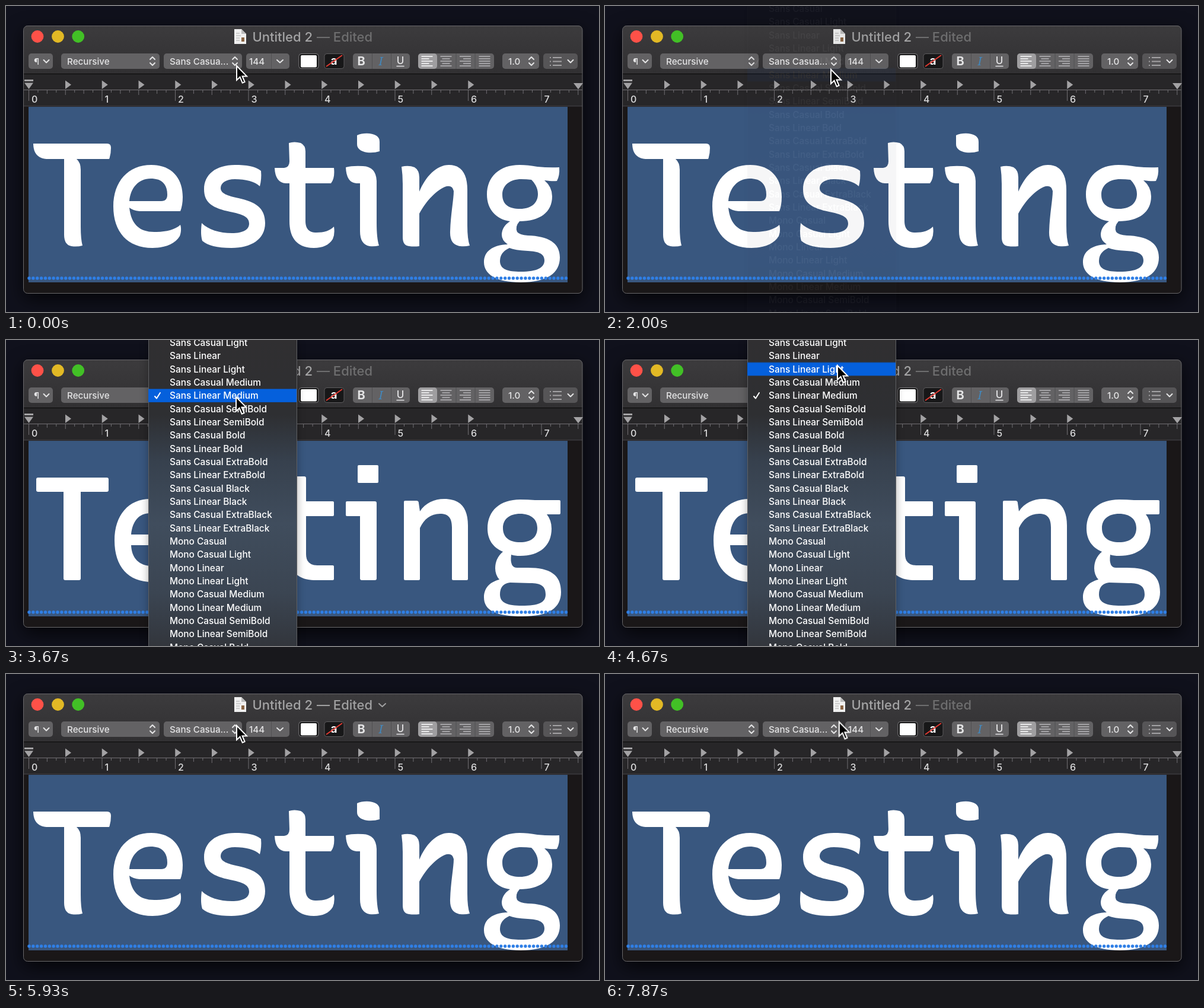
Animation, 1000 px wide and 516 px high, one loop 7940 ms. Source, as an HTML page:

```html
<!DOCTYPE html>
<html lang="en">
<head>
<meta charset="utf-8">
<title>Font style menu</title>
<style>
html, body { margin: 0; width: 100%; height: 100%; overflow: hidden; background: #10111c; }
svg { display: block; width: 100vw; height: 100vh; }
text { font: 500 15.2px Inter, Roboto, sans-serif; fill: #e4e4e5; }
.title { font-size: 22px; fill: #a4a4a5; }
.mid { text-anchor: middle; }
.num { font-size: 16px; fill: #dcdcdd; }
.menu text { font-size: 15.4px; fill: #fff; }
.line { fill: none; stroke: #e4e4e5; stroke-width: 2; stroke-linecap: round; stroke-linejoin: round; }

/* One loop is 7940 ms, so 1% is 79.4 ms. */
.a { animation: 7940ms linear infinite; }
.hard { animation-timing-function: step-end; }
#menuCasual { animation-name: openCasual; }
#menuLinear { animation-name: openLinear; }
#menuCasual .bar { animation-name: pickLinear; }
#menuLinear .bar { animation-name: pickCasual; }
.casual { animation-name: showCasual; }
.linear { animation-name: showLinear; }
#edited { animation-name: brighten; }
#titleArrow { animation-name: hover; }
#cursor { animation-name: point; }

@keyframes openCasual {
  0%, 6.67% { opacity: 0; } 6.68%, 22.4% { opacity: 1; } 25.35%, 100% { opacity: 0; }
}
@keyframes openLinear {
  0%, 36.14% { opacity: 0; } 36.15%, 63.6% { opacity: 1; } 66.5%, 100% { opacity: 0; }
}
@keyframes pickLinear {
  0% { transform: translateY(0); } 19% { transform: translateY(22.33px); }
}
@keyframes pickCasual {
  0% { transform: translateY(0); }
  51.4% { transform: translateY(-22.33px); }
  54.2% { transform: translateY(-44.66px); }
  61.1% { transform: translateY(-22.33px); }
}
@keyframes showCasual {
  0% { visibility: visible; } 26.07% { visibility: hidden; } 67.4% { visibility: visible; }
}
@keyframes showLinear {
  0% { visibility: hidden; } 26.07% { visibility: visible; } 67.4% { visibility: hidden; }
}
@keyframes brighten {
  0%, 67% { fill: #6e6e6f; } 69%, 81.5% { fill: #a0a0a1; } 84.5%, 100% { fill: #6e6e6f; }
}
@keyframes hover {
  0%, 67% { opacity: 0; } 69%, 81.5% { opacity: 1; } 84.5%, 100% { opacity: 0; }
}
@keyframes point {
  0% { transform: translate(389px, 101px); }
  6.3% { transform: translate(384px, 92px); }
  12.6% { transform: translate(383px, 92px); }
  16.4% { transform: translate(382px, 94px); }
  19.5%, 25.2% { transform: translate(381px, 107px); }
  30.2% { transform: translate(386px, 98px); }
  36.1%, 49.7% { transform: translate(388px, 96px); }
  56.7%, 59.4% { transform: translate(392px, 43px); }
  62.3% { transform: translate(390px, 72px); }
  69.3% { transform: translate(389px, 74px); }
  74.7% { transform: translate(389px, 87px); }
  82% { transform: translate(390px, 90px); }
  99.1% { transform: translate(395px, 80px); }
  100% { transform: translate(389px, 101px); }
}
</style>
</head>
<body>
<svg viewBox="0 0 1000 516" preserveAspectRatio="none">
  <defs>
    <linearGradient id="chrome" x2="0" y2="1">
      <stop stop-color="#3c3b3d"/><stop offset="1" stop-color="#313032"/>
    </linearGradient>
    <linearGradient id="glass" x2="0" y2="1">
      <stop stop-color="#302f31"/><stop offset=".25" stop-color="#2e2f32"/>
      <stop offset=".4" stop-color="#37414e"/><stop offset=".6" stop-color="#404d5d"/>
      <stop offset=".82" stop-color="#3b4552"/><stop offset="1" stop-color="#32353b"/>
    </linearGradient>
    <clipPath id="frame"><rect x="30" y="33" width="942" height="452" rx="7"/></clipPath>
  </defs>
  <rect width="1000" height="516" fill="#10111c"/>
  <rect x="30" y="33" width="942" height="452" rx="7" style="filter:drop-shadow(0 9px 15px #000b)"/>

  <g clip-path="url(#frame)">
    <rect x="30" y="33" width="942" height="452" fill="#1a1718"/>
    <rect x="30" y="33" width="942" height="81" fill="url(#chrome)"/>
    <rect x="30" y="114" width="942" height="55" fill="#272628"/>
    <path d="M30 114.5H972" stroke="#080808"/>
    <path d="M30 168.8H972" stroke="#48474a"/>
  </g>
  <rect x="29.5" y="33.5" width="942.5" height="451" rx="7" fill="none" stroke="#69686b"/>

  <circle cx="53" cy="51.5" r="10.4" fill="#fe5148"/>
  <circle cx="87.5" cy="51.5" r="10.4" fill="#e2b925"/>
  <circle cx="121.7" cy="51.5" r="10.4" fill="#42c026"/>

  <path d="M385 39H397L405 47V64H385Z" fill="#f0f0f0"/>
  <path d="M397 39V47H405Z" fill="#bbb"/>
  <path d="M388 46H394M388 50H396M388 54H394M388 58H394" stroke="#aaa"/>
  <path d="M397 53H402V60H397Z" fill="#8b6544"/>
  <text class="title" x="415.5" y="60">Untitled 2</text>
  <text id="edited" class="title a" x="524" y="60">— Edited</text>
  <path id="titleArrow" class="line a" d="M629 50L634.5 55L640 50" style="stroke:#a0a0a1"/>

  <g id="toolbar"></g>
  <text x="47" y="98.5">¶</text>
  <text x="103" y="98.5">Recursive</text>
  <text class="a hard casual" x="276" y="98.5">Sans Casua...</text>
  <text class="a hard linear" x="276" y="98.5">Sans Linea...</text>
  <text x="410" y="98.5">144</text>
  <text x="847" y="98.5">1.0</text>
  <path d="M447.5 80V106M617.5 80V106M649.5 80V106M759 80V106M791 80V106" stroke="#515052"/>
  <rect x="494" y="80.5" width="33" height="25" rx="4" fill="#161617" stroke="#7c7b7d"/>
  <rect x="497" y="83" width="27" height="20.5" rx="2" fill="#fff"/>
  <rect x="537" y="80.5" width="33" height="25" rx="4" fill="#171718" stroke="#5c5b5d"/>
  <text class="mid" x="553" y="98.5" style="font-size:19px;font-weight:700;fill:#fff">a</text>
  <path d="M540 102L567 83" stroke="#e33a32" stroke-width="2"/>
  <text class="mid" x="599" y="99.5" style="font-size:20px;font-weight:700">B</text>
  <text class="mid" x="632" y="99.5" style="font:italic 19px 'Noto Serif',serif;fill:#4387bb">I</text>
  <text class="mid" x="665" y="97.5" style="font-size:17px">U</text>
  <path d="M659 101.5H671" class="line" style="stroke-width:1.5"/>

  <g id="ruler"></g>
  <path d="M31 124H46V127H31ZM31 129.5H46L38.5 140ZM957 130H973L965 140.5Z" fill="#a3a2a4"/>

  <rect x="38" y="170" width="909" height="296" fill="#39577f"/>
  <g id="words" fill="#fff"></g>
  <path d="M39 459H946" stroke="#2f7fe6" stroke-width="5.4" stroke-linecap="round" stroke-dasharray="0 6.86"/>

  <g id="menuCasual" class="menu a"></g>
  <g id="menuLinear" class="menu a"></g>
  <path id="cursor" class="a" d="M0 0V24L5.6 18.8L9.7 28.6L13.6 27L9.5 17.4H17Z" stroke="#fff" stroke-width="2"/>
</svg>
<script>
const byId = id => document.getElementById(id);
const range = n => [...Array(n).keys()];
const path = (d, attrs = 'class="line"') => `<path d="${d}" ${attrs}/>`;

// Toolbar
const button = (x, end, fill = '#636264') =>
  `<rect x="${x}" y="80" width="${end - x}" height="26" rx="5" fill="${fill}"/>`;
const stepper = x => path(`M${x - 4} 90l4 -4l4 4M${x - 4} 96l4 4l4 -4`);
const down = (x, w = 4.5) => path(`M${x - w} 91l${w} 4.5l${w} -4.5`);
const alignIcon = (center, shift) => range(5).map(i => {
  const short = shift === null || i % 2 === 0 ? 0 : 6;
  const x = center - 9.5 + short * (shift || 0);
  return `M${x} ${85 + 4 * i}h${19 - short}`;
}).join('');

byId('toolbar').innerHTML =
  [[38, 79], [93, 259], [266, 398], [405, 478], [585, 681], [695, 823], [837, 899]]
    .map(([x, end]) => button(x, end)).join('') +
  button(906, 964, '#565557') + button(695, 727, '#9f9ea0') +
  [247, 386, 886].map(stepper).join('') +
  down(68) + down(462, 5) + down(952) +
  path(alignIcon(710, 0), 'stroke="#fff" stroke-width="1.6"') +
  path(alignIcon(742, .5) + alignIcon(774.5, 1) + alignIcon(807, null), 'stroke="#b9b8ba" stroke-width="1.6"') +
  path('M917 87h2m3 0h15M917 93.5h2m3 0h15M917 100h2m3 0h15', 'stroke="#a3a2a4" stroke-width="1.8"');

// Ruler
const inch = 123.5;
const tickLength = i => i % 8 === 0 ? 18 : i % 4 === 0 ? 8 : i % 2 === 0 ? 6 : 4;
byId('ruler').innerHTML =
  path('M30 141.5H972' + range(61).map(i => `M${38.5 + i * inch / 8} 142v${tickLength(i)}`).join(''), 'stroke="#716f73"') +
  path(range(12).map(i => `M${100 + i * inch / 2} 125.5l10 7.3l-10 7.3z`).join(''), 'fill="#a3a2a4"') +
  range(8).map(i => `<text class="num" x="${43 + i * inch}" y="163">${i}</text>`).join('');

// Large lettering, one outline per letter: T e s t i n g
const casual = [
  'M46 232H169Q177 231 177 239Q177 250 174 258H119Q126 264 126 276V372Q126 393 129 404Q122 406 114 405.5Q98 405 98 386V258H68Q46 256 46 232Z',
  `M208 340C211 368 225 381 250 381C269 381 284 378 294 369C296 375 295 383 293 388C285 402 266 408 247 408C205 408 181 381 181 338C181 296 206 268 245 268C280 268 298 291 298 322Q298 336 294 346H225Q214 345 208 340Z
   M208 329H262Q272 329 272 318C272 300 262 291 244 291C224 291 210 306 208 329Z`,
  'M428 304C420 296 404 292 386 292C370 292 362 299 362 307C362 316 373 320 392 324C420 330 437 340 437 366C437 393 414 408 380 408C356 408 340 404 331 396C328 386 329 375 330 366C341 377 360 383 381 383C400 383 410 377 410 367C410 355 398 351 378 347C350 341 334 333 334 309C334 284 354 268 386 268C405 268 420 270 430 278C431 288 430 296 428 304Z',
  'M477 231Q486 228 497 231Q505 235 505 245V273H553Q555 290 548 299H505V362C505 376 511 382 524 382C536 382 546 379 553 372Q555 384 551 393C545 403 534 408 519 408C492 408 478 392 478 363V299H472Q454 298 453 273H469Q478 272 478 262Z',
  `M592 218Q601 214 613 215Q630 217 630 229V245Q621 248 609 247Q592 244 592 233Z
   M573 272Q584 269 602 270Q624 271 625 295V365Q625 392 629 404Q621 406 613 405Q597 402 597 380V299H591Q574 298 573 272Z`,
  'M667 271Q679 268 689 272Q697 277 697 289V313C708 287 726 268 747 268C768 268 778 283 778 310V370Q778 393 782 404Q774 406 766 405Q748 403 749 380C750 350 755 326 755 312Q753 302 743 304C727 309 709 328 697 350V405Q688 406 680 405Q669 404 669 390V300Q669 285 667 271Z',
  `M866 268C876 268 885 269 896 271Q916 273 933 272Q934 286 929 295Q922 296 908 294Q921 305 921 321C921 348 900 363 866 363Q858 372 862 381Q866 386 880 387C914 388 934 399 934 424C934 450 913 466 868 466C826 466 806 452 806 432C806 414 820 403 846 402Q836 395 836 386Q836 372 850 363C827 360 811 343 811 318C811 288 832 268 866 268Z
   M869 292C850 292 837 302 837 318C837 334 847 342 867 342C886 342 897 332 897 317C897 306 891 298 886 293Q878 292 869 292Z
   M849 408Q833 415 833 430C833 444 846 448 868 448C896 448 908 441 908 429C908 417 897 414 880 413Q858 412 849 408Z`
];
const linear = [
  'M54 232H170q3 0 3 3V253q0 3-3 3H126V402q0 3-3 3H100q-3 0-3-3V256H54q-3 0-3-3V235q0-3 3-3Z',
  `M211 346C212 368 224 381 247 381C262 381 273 376 283 367L296 385C283 400 267 408 246 408C206 408 183 382 183 338C183 295 207 268 243 268C279 268 297 293 297 330V346Z
   M211 328H270C269 304 260 292 243 292C224 292 213 306 211 328Z`,
  'M417 303C408 296 397 292 384 292C369 292 361 298 361 307C361 317 372 320 390 325C418 331 433 341 433 366C433 393 412 408 380 408C358 408 342 402 329 390L345 371C355 379 366 383 380 383C397 383 406 377 406 367C406 355 396 352 376 347C349 341 334 332 334 309C334 284 354 268 384 268C404 268 419 273 431 284Z',
  'M481 230H503q3 0 3 3V272H551q2 0 2 2V295q0 2-2 2H506V361Q506 380 525 380H551q2 0 2 2V403q0 2-2 2H523C492 405 478 391 478 361V297H456q-2 0-2-2V274q0-2 2-2H478V233q0-3 3-3Z',
  'M595 211H626q2 0 2 2V239q0 2-2 2H595q-2 0-2-2V213q0-2 2-2ZM575 272H622q3 0 3 3V402q0 3-3 3H600q-3 0-3-3V297H575q-2 0-2-2V274q0-2 2-2Z',
  'M673 271H692q4 0 4 4L698 289C707 275 722 268 739 268C766 268 779 283 779 313V403q0 2-2 2H754q-2 0-2-2V316C752 300 746 293 732 293C716 293 705 302 698 317V403q0 2-2 2H673q-2 0-2-2V273q0-2 2-2Z',
  `M867 269Q880 269 892 270H933q2 0 2 2V292q0 2-2 2H912Q920 304 920 318C920 347 900 364 867 364Q858 364 852 362Q849 384 862 384H880C918 384 936 396 936 425C936 452 915 466 871 466C826 466 806 456 806 434C806 418 816 408 832 404Q825 396 825 385Q825 368 838 357C821 350 812 336 812 318C812 288 833 269 867 269Z
   M867 293C849 293 838 302 838 317C838 333 849 341 867 341C885 341 896 333 896 317C896 302 885 293 867 293Z
   M850 409Q833 411 833 429C833 443 845 448 870 448C898 448 910 443 910 429C910 415 902 410 884 410Z`
];
const word = (name, letters) =>
  `<g class="a hard ${name}" role="img" aria-label="Testing" fill-rule="evenodd">${letters.map(d => path(d, '')).join('')}</g>`;
byId('words').innerHTML = word('casual', casual) + word('linear', linear);

// Menus: the checked row always sits over the popup button
const weights = ['Medium', 'SemiBold', 'Bold', 'ExtraBold', 'Black', 'ExtraBlack'];
const styles = ['Sans', 'Mono'].flatMap(family => [
  ...['Casual', 'Casual Light', 'Linear', 'Linear Light'],
  ...weights.flatMap(weight => [`Casual ${weight}`, `Linear ${weight}`])
].map(style => `${family} ${style}`));

function buildMenu(id, checked) {
  const rows = styles.map((style, i) =>
    `<text x="276" y="${99.4 + (i - checked) * 22.33}">${style}</text>`).join('');
  byId(id).innerHTML =
    '<rect x="240.5" y="-5" width="250" height="526" fill="url(#glass)" stroke="#5f6063" style="filter:drop-shadow(0 4px 7px #0005)"/>' +
    '<rect class="bar a hard" x="240" y="82.5" width="250" height="22.4" fill="#0560dc"/>' +
    rows + path('M251 95L254 98.5L260 89', 'class="line" style="stroke:#fff"');
}
buildMenu('menuCasual', 4);
buildMenu('menuLinear', 5);
</script>
</body>
</html>
```
